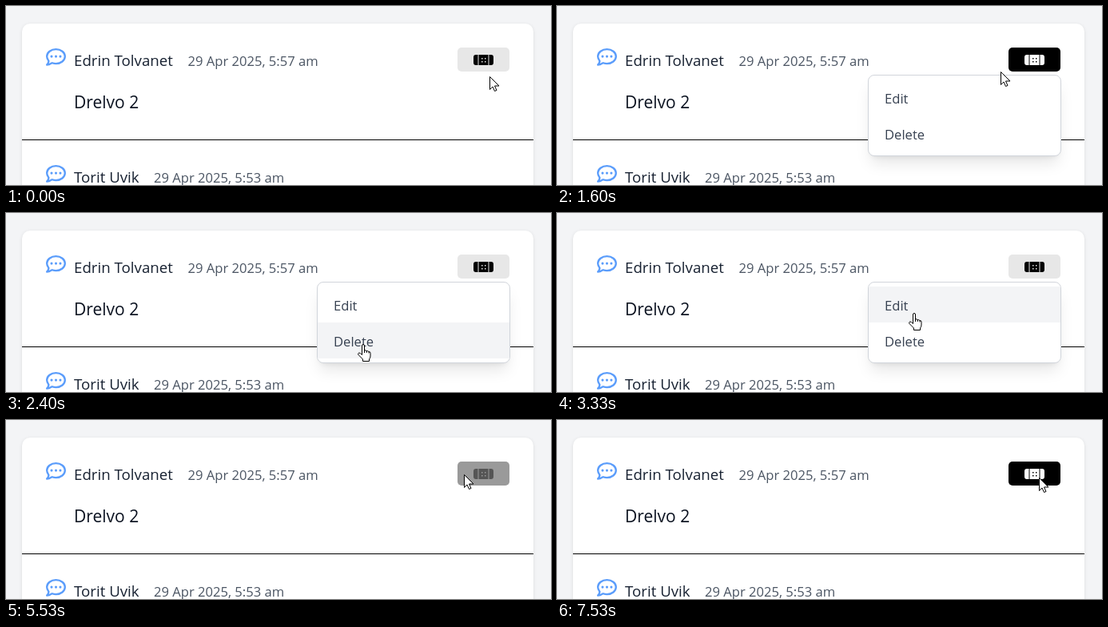
Recreate the animation shown at these times as an HTML page. Size 682x224 px, loop 8000 ms.

```html
<!DOCTYPE html>
<html lang="en">
<head>
<meta charset="utf-8">
<title>Message menu</title>
<style>
  html, body { margin: 0; width: 100%; height: 100%; overflow: hidden; background: #f3f4f6; }
  body { position: relative; font-family: "Open Sans", "Noto Sans", sans-serif; }
  svg { position: absolute; left: 0; top: 0; }
  .card, .menu { position: absolute; box-sizing: border-box; background: #fff; }
  .card { left: 20px; top: 22px; width: 640px; height: 240px; border-radius: 10px;
    box-shadow: 0 1px 4px rgb(0 0 0 / .1), 0 1px 2px -1px rgb(0 0 0 / .1); }
  .menu { left: 389px; top: 86px; width: 242px; height: 102px; padding: 5px 0;
    border: 1px solid #d1d5db; border-radius: 8px; transform-origin: 100% 0;
    box-shadow: 0 12.5px 19px -4px rgb(0 0 0 / .1), 0 5px 7.5px -5px rgb(0 0 0 / .1); }
  .row { height: 45px; padding-left: 20px; font-size: 16.6px; line-height: 47px; color: #374151; }
  .row.hover { background: #f3f4f6; }
  .name { font-size: 18.7px; fill: #172131; }
  .date { font-size: 16.6px; fill: #4b5563; }
  .message { font-size: 21px; fill: #0b1220; }
</style>
</head>
<body>
<div class="card"></div>
<svg width="682" height="224" viewBox="0 0 682 224">
  <defs>
    <g id="bubble" transform="scale(.0488)">
      <path fill="none" stroke="#5b9dfb" stroke-width="48" stroke-linejoin="round"
        d="M160 407C187 417 221 424 256 424c128 0 232-82 232-184S384 56 256 56 24 138 24 240c0 38 14 74 40 105 4 4 7 11 6 18-3 37-20 66-46 93 40 0 86-18 114-40 6-4 14-6 22-9z"/>
      <g fill="#5b9dfb"><circle cx="144" cy="240" r="32"/><circle cx="256" cy="240" r="32"/><circle cx="368" cy="240" r="32"/></g>
    </g>
  </defs>
  <use href="#bubble" transform="translate(50 51.4)"/>
  <text class="name" x="85" y="75">Edrin Tolvanet</text>
  <text class="date" x="227.5" y="75">29 Apr 2025, 5:57 am</text>
  <text class="message" x="85" y="128">Drelvo 2</text>
  <rect x="20" y="167" width="640" height="1"/>
  <use href="#bubble" transform="translate(50 197.4)"/>
  <text class="name" x="85" y="221">Torit Uvik</text>
  <text class="date" x="185" y="221">29 Apr 2025, 5:53 am</text>

  <rect class="face" x="565" y="52" width="65" height="30" rx="5"/>
  <path class="icon" d="M590.5 61H588q-3 0-3 3v7q0 3 3 3h2.500zM591.500 61h12v13h-12zM604.500 61h2.500q3 0 3 3v7q0 3-3 3h-2.500z"/>
  <path class="face" d="M595 65h1.500v1.500H595zM599 65h1.500v1.500H599zM595 69h1.500v1.500H595zM599 69h1.500v1.500H599z"/>
</svg>
<div class="menu"><div class="row">Edit</div><div class="row">Delete</div></div>
<svg width="682" height="224" viewBox="0 0 682 224">
  <g id="cursor" fill="#fff" stroke="#000" stroke-linejoin="round">
    <path id="arrow" d="M.5.5v16l3.500-3.500 2.500 5.500 2.500-1L6.500 12H12z"/>
    <g id="hand" transform="translate(-7 0)">
      <path d="M5.500 13V2q0-1.500 1.500-1.500T8.500 2v6q1.500-1 2.700.8 1.800-.8 2.700.8 2.100-.3 2.100 1.700V15q0 2.500-1.500 4v2.500h-8V19L1 13.500q-1-2 .7-2.500 1.500-.2 3.800 2.500z"/>
      <path fill="none" d="M8.500 7.500V11M11.200 8.500V11M14 9.500v2"/>
    </g>
  </g>
</svg>
<script>
  const LOOP = 8000, FPS = 15;

  // The pointer glides to each stop, then rests until the next glide.
  const home = { x: 605, y: 88 };
  const glides = [
    { from: 0, to: 267, x: 601, y: 69 },
    { from: 1467, to: 2200, x: 439, y: 117 },
    { from: 2200, to: 2400, x: 447, y: 164 },
    { from: 2800, to: 3333, x: 447, y: 125 },
    { from: 4333, to: 4867, x: 497, y: 62 },
    { from: 5333, to: 5733, x: 605, y: 71 },
    { from: 6400, to: 6667, x: 624, y: 112 },
    { from: 7133, to: 7533, x: 603, y: 72 }
  ];

  const clamp = v => Math.min(1, Math.max(0, v));
  const easeOut = p => Math.sin(p * Math.PI / 2);
  const mix = (a, b, p) => a + (b - a) * p;
  const gray = v => `rgb(${v} ${v} ${v})`;

  // Rises from 0 to 1 after "on" and falls back after "off".
  const fade = (t, on, off, span) => clamp((t - on) / span) - clamp((t - off) / span);

  function pointerAt(t) {
    return glides.reduce((at, g) => {
      const p = easeOut(clamp((t - g.from) / (g.to - g.from)));
      return { x: mix(at.x, g.x, p), y: mix(at.y, g.y, p) };
    }, home);
  }

  const find = s => document.querySelector(s);
  const faces = document.querySelectorAll('.face'), rows = document.querySelectorAll('.row');
  const icon = find('.icon'), menu = find('.menu');
  const cursor = find('#cursor'), arrow = find('#arrow'), hand = find('#hand');

  function draw(t) {
    const { x, y } = pointerAt(t);
    const dark = fade(t, 67, 1600, 200) + fade(t, 5467, 6467, 200) + fade(t, 7267, LOOP, 200);
    const shown = fade(t, 1367, 5050, 130);

    faces.forEach(f => f.setAttribute('fill', gray(mix(231, 0, dark))));
    icon.setAttribute('fill', gray(mix(0, 255, dark)));

    menu.style.opacity = shown;
    menu.style.transform = shown < 1 ? `scale(${mix(.865, 1, shown)})` : 'none';

    const onMenu = t > 1980 && shown === 1 && y >= 92;
    rows[0].classList.toggle('hover', onMenu && y < 137);
    rows[1].classList.toggle('hover', onMenu && y >= 137);

    cursor.setAttribute('transform', `translate(${Math.round(x)} ${Math.round(y)})`);
    arrow.style.display = onMenu ? 'none' : '';
    hand.style.display = onMenu ? '' : 'none';
  }

  const start = performance.now();
  function tick() {
    const t = (performance.now() - start) % LOOP;
    draw(Math.floor((t + 5) * FPS / 1000) * 1000 / FPS % LOOP);
    requestAnimationFrame(tick);
  }
  tick();
</script>
</body>
</html>
```
